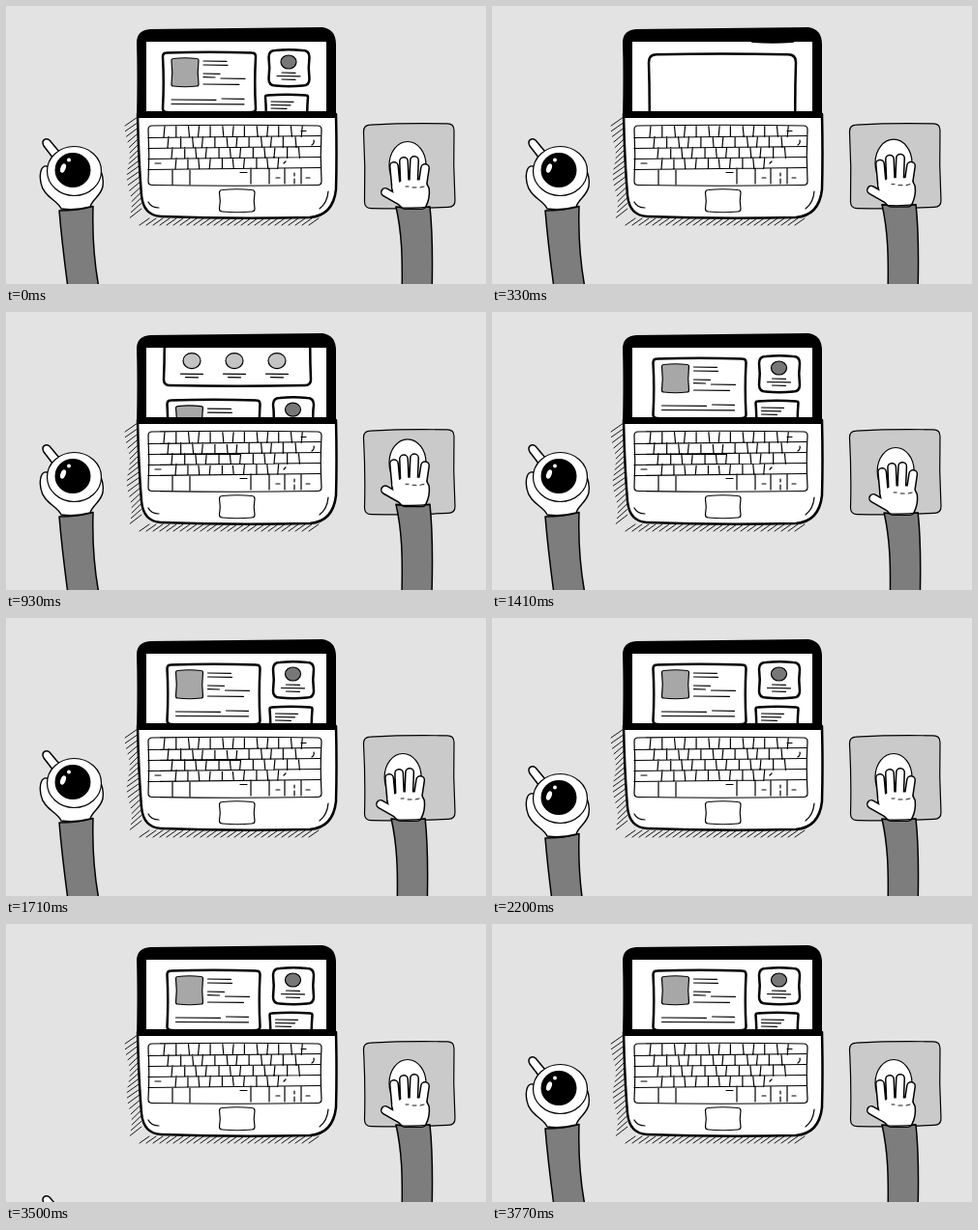
An HTML page that plays this animation: 496 by 288 pixels, repeating every 4.77 s.

```html
<!DOCTYPE html>
<html lang="en">
<head>
<meta charset="utf-8">
<title>Desk with laptop, coffee and mouse</title>
<style>
html, body { margin: 0; width: 100%; height: 100%; overflow: hidden; background: #e3e3e3; }
svg { display: block; width: 496px; height: 288px; }
g, path, ellipse { stroke-linecap: round; stroke-linejoin: round; }
.ink { fill: none; stroke: #000; stroke-width: 1.2; }
.thin { stroke-width: .9; }
.bold { stroke-width: 2.5; }
.white { fill: #fff; }
.sleeve { fill: #7d7d7d; stroke-width: 1.5; }
</style>
</head>
<body>
<svg viewBox="0 0 496 288">
  <defs>
    <clipPath id="screen"><rect x="145" y="37" width="186" height="72"/></clipPath>
    <g id="cards" class="ink"></g>
    <g id="hand">
      <path d="M401 166L403 188M411 161L412 186M422 160L421 186M433 168L430 188M392 193L406 201"/>
      <path d="M403 188L412 184H430L433 190Q434 198 430 206H412L405 199Z"/>
    </g>
  </defs>

  <path id="hatch" class="ink thin"/>
  <path class="ink bold white" d="M136 112Q137 160 140 196Q142 217 160 218Q235 221 314 219Q338 217 341 190Q342 155 341 112Z"/>
  <path d="M135 116Q136 70 135 38Q135 25 149 24Q240 23 327 22Q341 24 341 40V116Z"/>
  <rect class="white" x="145" y="37" width="186" height="72"/>

  <g clip-path="url(#screen)"><g id="page">
    <use href="#cards"/>
    <g id="sections" class="ink"></g>
    <use href="#cards" x="4.5" y="310"/>
  </g></g>

  <g id="keys" class="ink"></g>
  <path class="ink" d="M147 203Q150 209 158 209M324 210Q332 204 333 192"/>
  <g id="pad" class="ink" transform="rotate(-.8 417 166)"></g>

  <g id="mouse">
    <ellipse class="ink white" cx="415" cy="165" rx="19" ry="24.500"/>
    <path class="ink sleeve" d="M403 208Q421 210 438 208C441 235 441 265 440 302H409C410 260 409 235 403 208Z"/>
    <use href="#hand" fill="#000" stroke="#000" stroke-width="10"/>
    <use href="#hand" fill="#fff" stroke="#fff" stroke-width="7"/>
    <path class="ink thin" d="M413 187h3m4 1h4m4 0l4 -1"/>
    <path class="ink" d="M403 208.500Q421 210 438 208"/>
  </g>

  <g id="cup">
    <path class="ink sleeve" d="M55 212Q74 212 90 207.500C89 238 91 265 96 292H64C60 262 57 236 55 212Z"/>
    <path class="ink white" style="stroke-width:1.4" d="M57 210C54 202 38 197 36 183C34 172 37 165 42 166L95 167C100 172 101 181 100 187C98 197 89 200 87 208Q72 212 57 210Z"/>
    <path class="ink white" style="stroke-width:1.5" d="M49 158L39 145C36 139 41 136 45 139L55 151Z"/>
    <ellipse class="ink white" cx="70.500" cy="171" rx="28" ry="25.500"/>
    <ellipse cx="69" cy="170" rx="18.500" ry="18"/>
    <ellipse class="white" cx="59" cy="168" rx="2.600" ry="4.800" transform="rotate(22 59 168)"/>
    <circle class="white" cx="65" cy="159.500" r="2"/>
  </g>
</svg>
<script>
const el = id => document.getElementById(id);

// Hand-drawn box: rounded corners and slightly bowed sides.
function box(x, y, w, h, r, fill = '#fff', look = '') {
  const X = x + w, Y = y + h, cx = x + w / 2, cy = y + h / 2;
  return `<path class="${look}" fill="${fill}" d="M${x + r} ${y}Q${cx} ${y - 1.5} ${X - r} ${y}` +
    `Q${X} ${y} ${X} ${y + r}Q${X - 1.5} ${cy} ${X} ${Y - r}Q${X} ${Y} ${X - r} ${Y}` +
    `Q${cx} ${Y + 1.5} ${x + r} ${Y}Q${x} ${Y} ${x} ${Y - r}Q${x + 1.5} ${cy} ${x} ${y + r}Q${x} ${y} ${x + r} ${y}Z"/>`;
}
const card = (x, y, w, h, r) => box(x, y, w, h, r, '#fff', 'bold');
const disc = (x, y, r, fill) =>
  `<ellipse cx="${x}" cy="${y}" rx="${r}" ry="${r - 1}" fill="${fill}"/>`;
// Stack of text strokes, one for each width.
const text = (x, y, gap, ...widths) =>
  `<path d="${widths.map((w, i) => `M${x} ${y + i * gap}l${w} .3`).join('')}"/>`;
const centred = (x, y, ...widths) =>
  widths.map((w, i) => text(x - w / 2, y + i * 3.5, 0, w)).join('');

el('cards').innerHTML =
  card(162, 48.5, 96, 61.5, 4) + box(171, 54.5, 28, 28.5, 2, '#a7a7a7') +
  text(204, 57, 4, 24, 25) + text(204, 70, 3.7, 17, 12) + text(222, 75, 0, 25) +
  text(204, 81, 0, 37) + text(171, 97, 4.5, 46, 75) + text(223, 96, 0, 23) +
  card(271.5, 46, 42, 36.5, 7) + disc(292, 58, 8, '#777') + centred(292, 69, 14, 24, 14) +
  card(268, 92.5, 44, 39, 2) + text(274, 99, 3.5, 23, 20, 16);

let sections =
  card(162, 145, 152, 108.5, 8) + box(175, 210.5, 33, 23.5, 5) +
  box(255, 211, 47, 22, 1, '#a9a9a9') + text(213, 213, 4.7, 30, 26, 32, 17, 12) +
  text(212, 245, 0, 37) + text(252, 244.5, 0, 7) +
  card(163, 264, 152, 79, 6) + text(177, 275, 4, 31, 59);
for (let x = 192; x < 290; x += 44)
  sections += disc(x, 317.5, 9, '#c4c4c4') + centred(x, 331, 23, 13);
el('sections').innerHTML = sections;

// Keyboard rows with evenly jittered keys, then the space bar row.
let keys = '';
for (let row = 0; row < 4; row++) {
  const y = 124.5 + row * 11, end = row < 3 ? 309 : 285;
  keys += `M147 ${y + 12}Q236 ${y + 11} 325 ${y + 10}`;
  for (let x = 164 + row * 4, i = 0; x < end; x += 11.8 + Math.sin(i++ * 2 + row))
    keys += `M${x} ${y}l${i % 3 - 1} 11`;
}
keys += 'M172 169v16M190 169v16M253 168v16M272 168v16M288 168v16M305 168v16M298 173v3m0 3v5' +
  'M305 129.500h5M318 139q1 3 -2 5M154 163h6M287 163l2 -2M242 172.500h7M279 178h4M310 178h4';
el('keys').innerHTML = box(147, 124, 179, 61.5, 4) +
  `<path d="${keys}"/>` + box(220.5, 190.5, 36.5, 22.5, 3);

el('pad').innerHTML = box(370, 122.5, 93.5, 86.5, 7, '#cacaca');

// Shadow hatching along the left and bottom edges of the laptop.
let hatch = '';
for (let y = 115; y < 213; y += 5.6)
  hatch += `M${136 + (y - 115) * .04} ${y}l${-11 - 2 * Math.sin(y)} 9`;
for (let x = 148; x < 330; x += 7) hatch += `M${x} 220l-10 7`;
el('hatch').setAttribute('d', hatch);

const LOOP = 4770, STEP = 30;
const move = (id, x, y) => el(id).setAttribute('transform', `translate(${x} ${y})`);
const steps = (t, start, max) =>
  Math.max(0, Math.min(max, Math.floor((t - start) / STEP) + 1));

function draw(t) {
  const scroll = steps(t, 30, 36);
  move('page', 0, -scroll * 310 / 36);

  const push = -9 * Math.sin(Math.PI * (scroll % 12) / 12);
  const sway = 5 * Math.sin(2 * Math.PI * steps(t, 1410, 14) / 14);
  move('mouse', sway, push);

  move('cup', 0, 16 * (steps(t, 2200, 10) - steps(t, 3500, 10)));
}

const begin = performance.now();
function tick() {
  draw((performance.now() - begin) % LOOP);
  requestAnimationFrame(tick);
}
tick();
</script>
</body>
</html>
```
